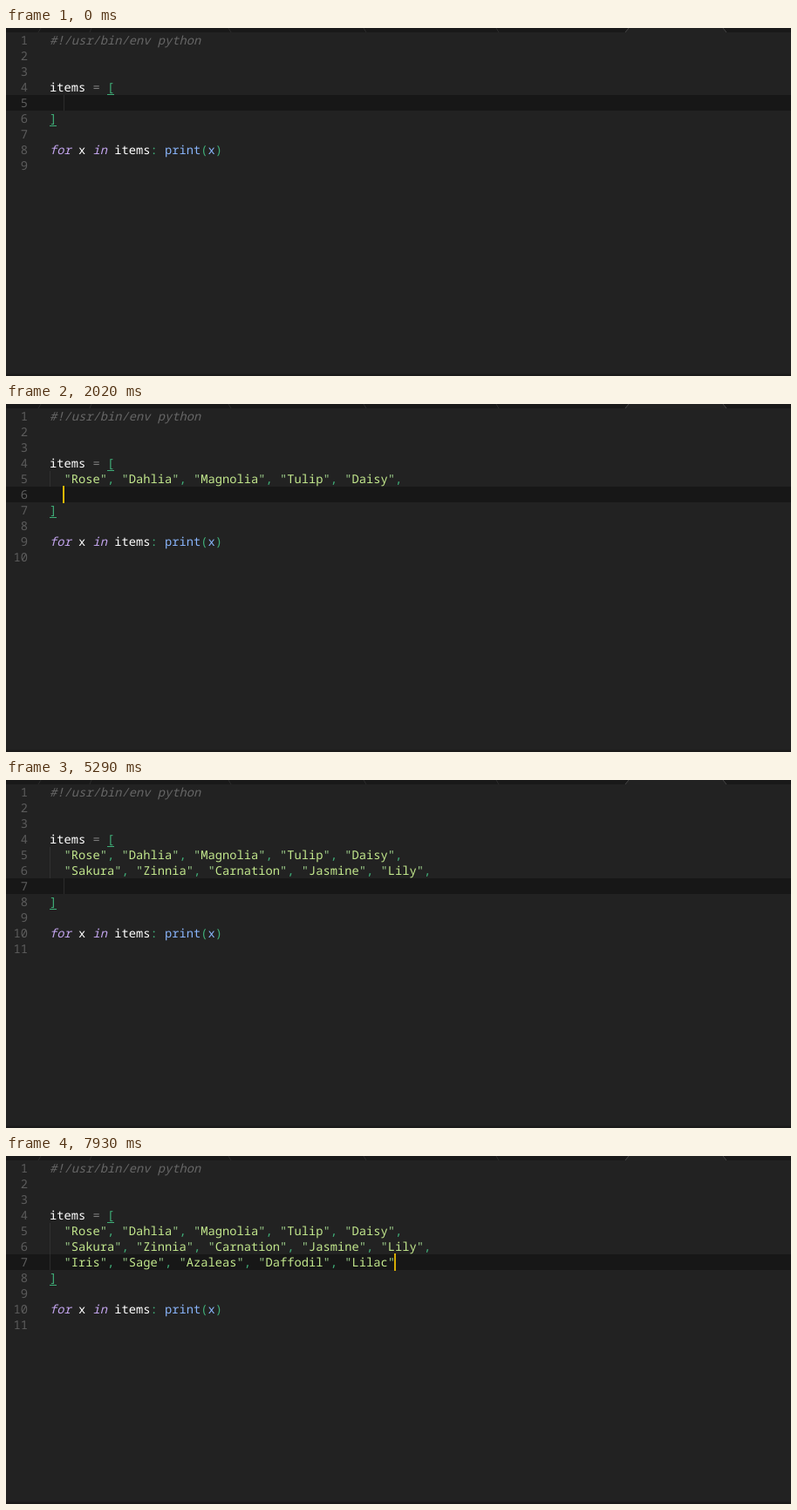
An HTML page that plays this animation: 900 px wide and 400 px high, repeating every 8000 ms.

```html
<!DOCTYPE html>
<html lang="en">
<head>
<meta charset="utf-8">
<title>Editor autocomplete</title>
<style>
  html, body { margin: 0; width: 100%; height: 100%; overflow: hidden; background: #222; }
  svg { display: block; width: 900px; height: 400px; }
  text {
    font: 13.75px "Noto Sans Mono", "DejaVu Sans Mono", monospace;
    white-space: pre;
    text-rendering: geometricPrecision;
  }
  .i { font-style: italic; }
  .b { font-weight: 700; }
</style>
</head>
<body>
<svg viewBox="0 0 900 400" xmlns="http://www.w3.org/2000/svg">
  <rect width="900" height="400" fill="#222"/>
  <rect width="900" height="5" fill="#191919"/>
  <path d="M713 0H822L826 5H710Z" fill="#222"/>
  <path d="M714 0L710 5M822 0L826 5" stroke="#444" fill="none"/>
  <path d="M40 0L37 5M255 0L258 5M410 0L413 5M562 0L565 5M98 0L96 5" stroke="#2b2b2b" fill="none"/>
  <rect y="397.5" width="900" height="2.5" fill="#1a1a1a"/>
  <g id="editor"></g>
</svg>
<script>
const LOOP = 8000, CHAR = 8.25, LEFT = 50, LINE = 18, ROW = 22;
const C = {
  plain: '#fff', dim: '#666', num: '#5c5c5c', green: '#3fae78', key: '#c3a5ee',
  call: '#89b4fa', str: '#c3e88d', quote: '#9fd08c', caret: '#ffcc00'
};
const editor = document.getElementById('editor');

const bouquets = [
  ['Rose', 'Dahlia', 'Magnolia', 'Tulip', 'Daisy'],
  ['Sakura', 'Zinnia', 'Carnation', 'Jasmine', 'Lily'],
  ['Iris', 'Sage', 'Azaleas', 'Daffodil', 'Lilac']
].map(list => '  ' + list.map(name => `"${name}"`).join(', '));

// A caret sign marks the next letter as matched.
const fun = name => [name, 'gFun'];
const auto = name => [name, 'autoFill'];
const wideRows = [
  ...['^fcontext_set_^line_^width', '^fcontext_get_^line_^width',
    '^fcontext_get_^line_^width_unit', '^fcontext_set_^line_^width_unit',
    '^ffile_^webp_^load', '^ffile_^wmf_^load', '^ffile_^wmf_^load_thumb'].map(fun),
  ['^f^lo^wers', '']
];
const shortRows = [
  ['^f^lowers', ''],
  ...['^f^lighting', '^f^lic', '^f^lava', '^f^laplace'].map(fun),
  ...['A', 'B', 'C'].map(s => auto('^f^lowers' + s))
];
const popups = {
  f: shortRows.map(([name, tag]) => [name.replace('^l', 'l'), tag]),
  fl: shortRows,
  flw: wideRows
};
for (const s of 'abc') {
  popups['flw' + s] = [auto('^f^lo^wers^' + s.toUpperCase()), ...wideRows.slice(0, 7)];
}

// [time, finished lines, text of the current line, popup key]
const steps = [
  [0, 0, '  ', ''],
  [300, 0, '  f', ''], [380, 0, '  f', 'f'], [620, 0, '  fl', 'fl'],
  [700, 0, '  flw', 'flw'], [930, 0, '  flwa', 'flw'], [1010, 0, '  flwa', 'flwa'],
  [1310, 0, bouquets[0], ''], [1630, 0, bouquets[0] + ',', ''],
  [1940, 1, '  ', ''],
  [2710, 1, '  f', ''], [2790, 1, '  f', 'f'], [2860, 1, '  fl', 'fl'],
  [3090, 1, '  flw', 'flw'], [3410, 1, '  flwb', 'flw'], [3480, 1, '  flwb', 'flwb'],
  [3800, 1, bouquets[1], ''], [4190, 1, bouquets[1] + ',', ''],
  [4580, 2, '  ', ''],
  [5360, 2, '  f', ''], [5440, 2, '  f', 'f'], [5740, 2, '  fl', 'f'],
  [5820, 2, '  fl', 'fl'], [6140, 2, '  flw', 'flw'], [6300, 2, '  flwc', 'flwc'],
  [6600, 2, bouquets[2], '']
];
// [time, caret opacity]
const blink = [
  [0, 0], [300, 1], [2020, .88], [2250, .45], [2330, 0], [2630, 1],
  [5060, .85], [5130, .5], [5210, 0], [5360, 1],
  [6830, .85], [6910, .45], [6990, 0], [7220, .45], [7300, .85], [7380, 1],
  [7850, .92], [7930, .82]
];

const stateAt = (list, t) => list.filter(entry => entry[0] <= t).pop();
const lineTop = n => 5 + LINE * (n - 1);
const text = (x, y, s, fill, cls = '') =>
  `<text x="${x}" y="${y}" fill="${fill}" class="${cls}">${s}</text>`;
const rect = (x, y, w, h, fill, extra = '') =>
  `<rect x="${x}" y="${y}" width="${w}" height="${h}" fill="${fill}" ${extra}/>`;
const code = (n, col, s, fill, cls) => text(LEFT + col * CHAR, lineTop(n) + 14, s, fill, cls);
const bracket = (n, col, s) =>
  code(n, col, s, C.green) + rect(LEFT + col * CHAR, lineTop(n) + 17, 8, 1, C.green);

function typed(n, line) {
  const word = line.includes('"') ? C.str : C.plain;
  const color = s => s === '"' ? C.quote : s === ',' ? C.green : word;
  return [...line.matchAll(/"|,|[^\s",]+/g)]
    .map(m => code(n, m.index, m[0], color(m[0]))).join('');
}

function popup(y, rows) {
  let out = rect(60, y, 300, ROW * 8, '#2d2d2d') + rect(60, y, 285, ROW, '#565656') +
    rect(349, y + 4, 7, 168, '#3b3b3b') + rect(349, y + 4, 7, 24, '#5c5c5c');
  rows.forEach(([name, tag], i) => {
    const base = y + 15 + ROW * i;
    out += text(66, base, name.replace(/\^(.)/g, '<tspan class="b">$1</tspan>'), C.plain);
    out += text(339 - tag.length * CHAR, base, tag, C.plain, 'i');
  });
  return out;
}

function scene(t) {
  const [, done, line, key] = stateAt(steps, t);
  const current = 5 + done, close = current + 1, last = current + 3;
  let out = rect(0, lineTop(current), 900, LINE, '#171717');
  for (let n = 1; n <= current + 4; n++) {
    out += text(25 - CHAR * String(n).length, lineTop(n) + 14, n, C.num);
  }
  out += code(1, 0, '#!/usr/bin/env python', C.dim, 'i');
  out += code(4, 0, 'items', C.plain) + code(4, 6, '=', '#7c7c7c') + bracket(4, 8, '[');
  for (let i = 0; i < done; i++) {
    out += rect(50, lineTop(5 + i), 1, LINE, '#303030') + typed(5 + i, bouquets[i] + ',');
  }
  out += rect(line.trim() ? 50 : 66, lineTop(current), 1, LINE, '#2b2b2b') + typed(current, line);
  out += bracket(close, 0, ']');
  out += code(last, 0, 'for', C.key, 'i') + code(last, 4, 'x', C.plain) +
    code(last, 6, 'in', C.key, 'i') + code(last, 9, 'items', C.plain) +
    code(last, 14, ':', C.green) + code(last, 16, 'print', C.call) +
    code(last, 21, '(', C.green) + code(last, 22, 'x', C.call) + code(last, 23, ')', C.green);
  out += rect(Math.round(LEFT + line.length * CHAR - 1.1), lineTop(current) - 1, 2, 20, C.caret,
    `opacity="${stateAt(blink, t)[1]}"`);
  return key ? out + popup(lineTop(current) + LINE, popups[key]) : out;
}

let shown = '';
function draw(now) {
  const next = scene(Math.max(0, now) % LOOP);
  if (next !== shown) editor.innerHTML = shown = next;
  requestAnimationFrame(draw);
}
draw(performance.now());
</script>
</body>
</html>
```
